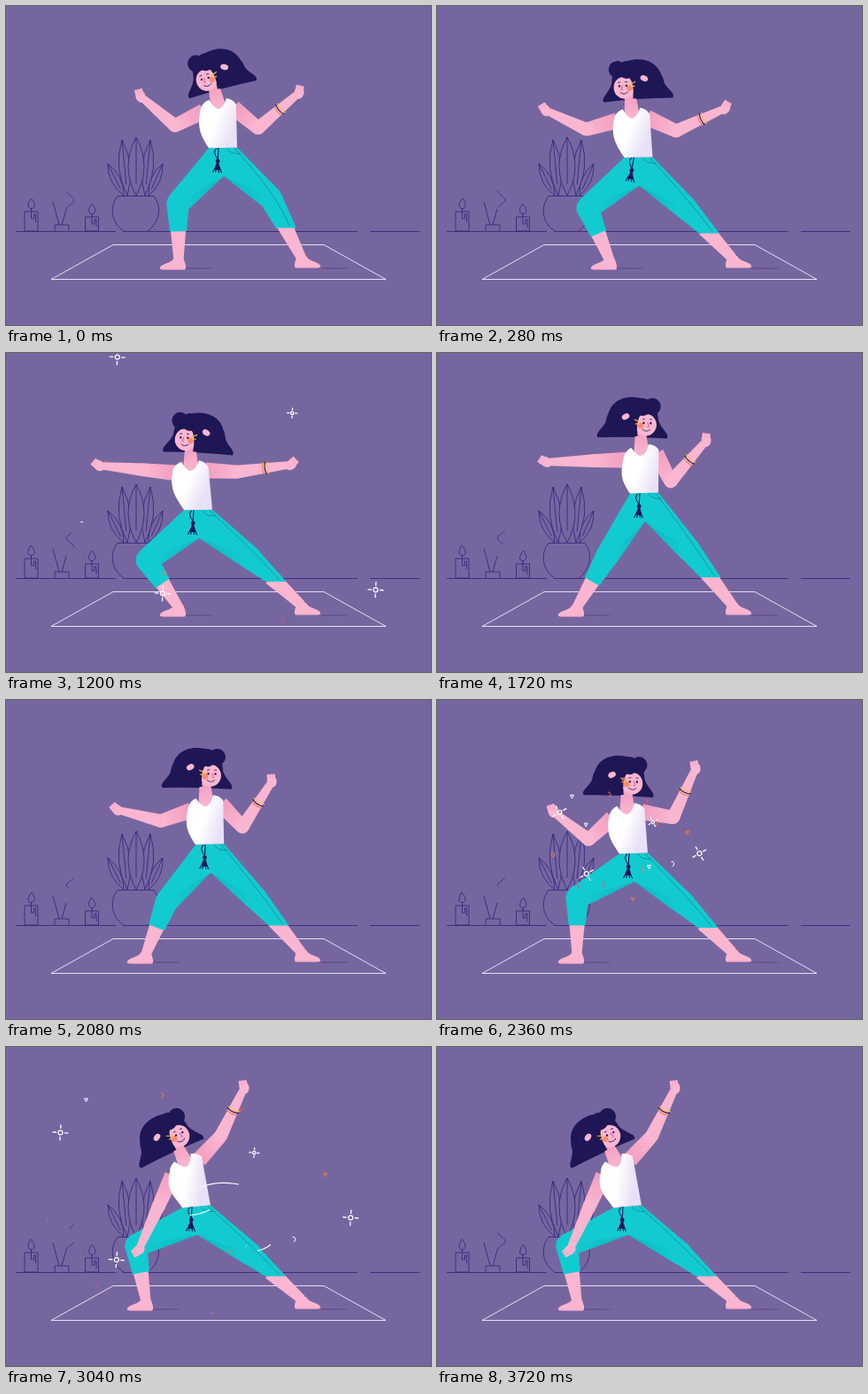
These frames come from a looping animation (480 by 360 pixels, 3800 ms). An HTML page with a canvas:

```html
<!DOCTYPE html>
<html lang="en">
<head>
<meta charset="utf-8">
<title>Yoga flow</title>
<style>
html, body { margin: 0; width: 100%; height: 100%; overflow: hidden; background: #7666a0; }
canvas { display: block; width: 480px; height: 360px; }
</style>
</head>
<body>
<canvas id="stage" width="480" height="360"></canvas>
<script>
const ctx = document.getElementById('stage').getContext('2d');
const LOOP = 3800;
const WALL = '#7666a0', SKIN = '#fab6d0', BLUSH = '#f29ec0', HAIR = '#1f1755', TEAL = '#12cbd0';
const INK = 'rgba(45,35,122,.8)', ORANGE = '#ee7c4c', RED = '#dd5566', YELLOW = '#f3c044', WHITE = '#fff';

const clamp = (v, a = 0, b = 1) => Math.min(b, Math.max(a, v));
const mix = (a, b, k) => Array.isArray(a) ? a.map((v, i) => mix(v, b[i], k)) : a + (b - a) * k;
const add = (p, q) => [p[0] + q[0], p[1] + q[1]];
const gap = (a, b) => Math.hypot(b[0] - a[0], b[1] - a[1]);
const rad = deg => deg * Math.PI / 180;
const turn = ([x, y], deg) => {
  const c = Math.cos(rad(deg)), s = Math.sin(rad(deg));
  return [x * c - y * s, x * s + y * c];
};

const easeIn = k => k * k;
const easeOut = k => 1 - (1 - k) ** 2;
const easeOutCubic = k => 1 - (1 - k) ** 3;
const easeInOut = k => k < .5 ? 4 * k ** 3 : 1 - (2 - 2 * k) ** 3 / 2;

// Elbows, knees, shoulders and head follow from these few joints
const RISE_LEFT = { hip: [245, 160], neck: [239, 104], left: [152, 102], right: [331, 98], foot: 195, lean: -6, tilt: -15, facing: -1 };
const WARRIOR = { hip: [217, 177], neck: [208, 121], left: [105, 127], right: [322, 126], foot: 195, lean: -4, tilt: 3, facing: -1 };
const RISE_RIGHT = { hip: [234, 158], neck: [229, 104], left: [123, 123], right: [304, 99], foot: 158, lean: -11, tilt: 1, facing: 1 };
const SINK = { hip: [222, 173], neck: [213, 117], left: [131, 126], right: [292, 77], foot: 158, lean: -10, tilt: 2, facing: 1 };
const SIDE_BEND = { hip: [215, 180], neck: [199, 124], left: [150, 229], right: [269, 46], foot: 158, lean: -26, tilt: -25, facing: 1 };
const MOVES = [
  [0, 1000, RISE_LEFT, WARRIOR, easeOutCubic],
  [1300, 1720, WARRIOR, RISE_RIGHT, easeInOut],
  [1720, 2360, RISE_RIGHT, SINK, easeIn],
  [2360, 2960, SINK, SIDE_BEND, easeOut]];

function poseAt(t) {
  const [start, end, from, to, ease] = MOVES.findLast(m => t >= m[0]);
  const k = ease(clamp((t - start) / (end - start)));
  return Object.fromEntries(Object.keys(from).map(key => [key, mix(from[key], to[key], k)]));
}

// Middle joint of a two-part limb from a to b
function joint(a, b, upper, lower, bend) {
  const d = gap(a, b);
  if (d >= upper + lower) return mix(a, b, upper / (upper + lower));
  const along = (upper ** 2 - lower ** 2 + d * d) / (2 * d);
  const out = bend * Math.sqrt(Math.max(0, upper ** 2 - along ** 2));
  const ux = (b[0] - a[0]) / d, uy = (b[1] - a[1]) / d;
  return [a[0] + ux * along - uy * out, a[1] + uy * along + ux * out];
}

function fill(style, build) {
  ctx.fillStyle = style;
  ctx.beginPath();
  build();
  ctx.fill();
}

function stroke(style, width, build) {
  ctx.strokeStyle = style;
  ctx.lineWidth = width;
  ctx.beginPath();
  build();
  ctx.stroke();
}

function at([x, y], deg, draw) {
  ctx.save();
  ctx.translate(x, y);
  ctx.rotate(rad(deg));
  draw();
  ctx.restore();
}

const path = (...pts) => pts.forEach((p, i) => i ? ctx.lineTo(...p) : ctx.moveTo(...p));
const poly = (...pts) => { path(...pts); ctx.closePath(); };
const disc = (x, y, r) => { ctx.moveTo(x + r, y); ctx.arc(x, y, r, 0, 7); };
const oval = (x, y, rx, ry, rot = 0) => ctx.ellipse(x, y, rx, ry, rot, 0, 7);

function side(a, b, half) {
  const d = gap(a, b) || 1;
  return [-(b[1] - a[1]) / d * half, (b[0] - a[0]) / d * half];
}

function taper(style, a, b, wa, wb, endSide = side(a, b, wb / 2)) {
  const [ax, ay] = side(a, b, wa / 2), [bx, by] = endSide;
  fill(style, () => poly([a[0] + ax, a[1] + ay], [b[0] + bx, b[1] + by],
    [b[0] - bx, b[1] - by], [a[0] - ax, a[1] - ay]));
}

function gradient(a, b, from, to) {
  const g = ctx.createLinearGradient(...a, ...b);
  g.addColorStop(0, from);
  g.addColorStop(1, to);
  return g;
}

function leaf(base, tip, w) {
  const [nx, ny] = side(base, tip, w), [mx, my] = mix(base, tip, .5);
  const outline = () => {
    ctx.moveTo(...base);
    ctx.quadraticCurveTo(mx + nx, my + ny, ...tip);
    ctx.quadraticCurveTo(mx - nx, my - ny, ...base);
  };
  fill(WALL, outline);
  stroke(INK, 1, () => { outline(); path(tip, mix(tip, base, .8)); });
}

function candle(x, y, t) {
  const c = x + 7.5, sway = Math.sin(t / LOOP * Math.PI * 12) * .7;
  stroke(INK, 1, () => {
    ctx.rect(x, y, 15, 254 - y);
    path([c, y], [c, y - 4]);
    ctx.moveTo(c, y - 3);
    ctx.bezierCurveTo(c - 6, y - 5, c - 3, y - 11, c + sway, y - 15);
    ctx.bezierCurveTo(c + 4, y - 10, c + 6, y - 5, c, y - 3);
    path([c, y], [c, y + 8], [c + 3, y + 8], [c + 3, y + 3], [c + 5, y + 3], [c + 5, y + 12]);
  });
}

function smoke(low, high) {
  if (low - high < 1) return;
  stroke(INK, 1, () => {
    for (let y = low; y >= high; y -= .5)
      ctx.lineTo(72.7 + 4.3 * Math.cos((y - 219) * Math.PI / 10), y);
  });
}

function room(t) {
  ctx.fillStyle = WALL;
  ctx.fillRect(0, 0, 480, 360);
  for (const dir of [-1, 1]) {
    leaf([147 + dir * 10, 214], [147 + dir * 16, 151], 13);
    leaf([147 + dir * 14, 214], [146 + dir * 31, 178], 10);
  }
  leaf([147, 214], [147, 148], 18);
  stroke(INK, 1, () => {
    path([11, 254.5], [124, 254.5]);
    path([132, 254.5], [397, 254.5]);
    path([411, 254.5], [467, 254.5]);
    ctx.moveTo(126, 214.5);
    ctx.lineTo(167, 214.5);
    ctx.bezierCurveTo(176, 226, 174, 244, 160, 254);
    ctx.moveTo(133, 254);
    ctx.bezierCurveTo(118, 244, 117, 226, 126, 214.5);
    path([55, 254], [55, 247], [71, 247], [71, 254]);
    path([60, 247], [53, 221]);
    path([63, 247], [68, 229]);
  });
  candle(21, 232, t);
  candle(89.5, 238, t + 300);
  const k = t / LOOP;
  smoke(229 - 30 * k, Math.max(200, 209 - 20 * k));
  smoke(229, 229 - 20 * clamp((t - 2560) / 1100));
  stroke('rgba(255,255,255,.8)', 1, () => poly([121, 269.5], [359, 269.5], [429, 308.5], [51, 308.5]));
}

function foot([x, y], dir) {
  fill('rgba(50,36,110,.28)', () => oval(x + 29 + dir * 7, 296, 17, 1.1));
  ctx.save();
  ctx.translate(x, y);
  ctx.scale(dir, 1);
  fill(SKIN, () => {
    ctx.moveTo(-5, -3);
    ctx.lineTo(5, -3);
    ctx.bezierCurveTo(8, 4, 19, 3, 21, 8);
    ctx.quadraticCurveTo(22, 10.5, 18, 10.5);
    ctx.lineTo(-7, 10.5);
    ctx.quadraticCurveTo(-10, 8, -5, -3);
  });
  stroke(BLUSH, .7, () => path([-6, 10], [18, 10]));
  ctx.restore();
}

function hand(p, forearm, dir) {
  at(p, forearm - dir * 35, () => {
    fill(SKIN, () => oval(0, 0, 7, 5.5));
    ctx.lineCap = 'round';
    for (const y of [-3.6, -.6, 2.4]) stroke(SKIN, 3.2, () => path([3, y], [7, y]));
    ctx.lineCap = 'butt';
    for (const y of [-2, 1]) stroke(BLUSH, .8, () => path([3, y], [8, y]));
  });
}

function bracelet(elbow, palm) {
  [[ORANGE, .49], [HAIR, .53], [YELLOW, .57]].forEach(([color, k]) => {
    const p = mix(elbow, palm, k), [nx, ny] = side(elbow, palm, 7);
    stroke(color, 1.1, () => {
      ctx.moveTo(p[0] - nx, p[1] - ny);
      ctx.quadraticCurveTo(p[0] - ny * .4, p[1] + nx * .4, p[0] + nx, p[1] + ny);
    });
  });
}

function arm(shoulder, palm, forearm, dir) {
  const elbow = joint(shoulder, palm, 36, forearm, dir);
  const wrist = mix(elbow, palm, 1 - 4 / gap(elbow, palm));
  taper(gradient(shoulder, elbow, BLUSH, SKIN), shoulder, elbow, 18, 15);
  fill(SKIN, () => disc(...elbow, 7.4));
  taper(SKIN, elbow, wrist, 15, 8.5);
  hand(palm, Math.atan2(palm[1] - elbow[1], palm[0] - elbow[0]) * 180 / Math.PI, dir);
  if (dir > 0) bracelet(elbow, palm);
}

function leg(hip, waist, crotch, ankle, thigh, shin, dir) {
  const knee = joint(hip, ankle, thigh, shin, -dir), cuff = mix(knee, ankle, .49);
  const [nx, ny] = side(hip, knee, -13 * dir);
  const inner = [knee[0] - nx, knee[1] - ny];
  // The far trouser leg ends in a level hem
  const hem = dir > 0 ? [-11.5, 0] : side(knee, cuff, 9.5);
  foot(ankle, dir);
  taper(SKIN, mix(knee, ankle, .4), ankle, 18, 11);
  fill(TEAL, () => poly(waist, [knee[0] + nx, knee[1] + ny], inner, crotch));
  fill(gradient(crotch, knee, 'rgba(8,145,170,.3)', 'rgba(8,145,170,0)'), () => poly(crotch, inner, knee));
  fill(TEAL, () => disc(...knee, 12.7));
  taper(TEAL, knee, cuff, 25.4, 20, hem);
  return { knee, cuff };
}

function pants({ hip, foot: footX, lean }, t) {
  const wL = add(hip, turn([-16, 0], lean * .2)), wR = add(hip, turn([16, 0], lean * .2));
  const crotch = add(hip, [1, 32]);
  const step = Math.sin(clamp((t - 1300) / 420) * Math.PI) * 6;
  const { knee, cuff } = leg(hip, wR, crotch, [334, 285], 79, 76, 1);
  leg(hip, wL, crotch, [footX, 287 - step], 81, 64, -1);
  fill(TEAL, () => poly(wL, wR, add(crotch, [4, 0]), add(crotch, [-4, 0])));
  stroke('#168795', .8, () => {
    ctx.moveTo(wR[0] - 11, wR[1] + 1);
    ctx.quadraticCurveTo(wR[0] - 8, wR[1] + 8, wR[0] + 4, wR[1] + 7);
    ctx.moveTo(wR[0] - 3, wR[1] + 1);
    ctx.quadraticCurveTo(knee[0] + 6, knee[1] - 6, cuff[0] + 4, cuff[1] - 2);
  });
  return [wL, wR];
}

function shirt(neck, lean, sL, sR, wL, wR) {
  const near = (x, y) => add(neck, turn([x, y], lean));
  const shade = gradient(mix(sL, sR, .6), add(sR, [5, 10]), WHITE, '#e8e0f6');
  fill(shade, () => {
    ctx.moveTo(...near(-10, 1));
    ctx.quadraticCurveTo(...near(0, 23), ...near(10, 1));
    ctx.quadraticCurveTo(...near(17, 3), ...sR);
    ctx.lineTo(...wR);
    ctx.lineTo(...wL);
    ctx.bezierCurveTo(wL[0] - 9, wL[1] - 14, sL[0] - 5, sL[1] + 22, ...sL);
    ctx.quadraticCurveTo(...near(-17, 3), ...near(-10, 1));
  });
}

function tassel(p, t) {
  const swing = 23 * Math.exp(-(((t - 560) / 250) ** 2)) + 3;
  at(p, swing, () => {
    stroke(HAIR, 1.1, () => {
      path([0, 0], [0, 15]);
      ctx.moveTo(0, 13);
      ctx.quadraticCurveTo(-7, 5, -2, 1);
      for (const x of [-5, -2, 2, 5]) path([0, 17], [x, 28]);
    });
    fill(HAIR, () => { disc(0, 15, 2.4); poly([-1, 16], [1, 16], [3.5, 25], [-3.5, 25]); });
  });
}

function hair() {
  ctx.moveTo(-39, 19);
  ctx.bezierCurveTo(-43, 13, -31, 9, -28, -5);
  ctx.bezierCurveTo(-26, -20, -14, -27, 0, -27);
  ctx.bezierCurveTo(14, -27, 26, -20, 28, -5);
  ctx.bezierCurveTo(31, 9, 43, 13, 39, 19);
  ctx.quadraticCurveTo(0, 17, -39, 19);
}

function face(f) {
  fill(SKIN, () => oval(f * 15, 4, 12, 12.5));
  fill(HAIR, () => {
    ctx.moveTo(f * 29, -2);
    ctx.quadraticCurveTo(f * 22, -10, f * 9, -8);
    ctx.quadraticCurveTo(f * 3, 2, f * 6, 17);
    ctx.lineTo(-f * 34, 18);
    ctx.bezierCurveTo(-f * 29, 8, -f * 32, -2, -f * 27, -9);
    ctx.bezierCurveTo(-f * 18, -30, f * 16, -30, f * 27, -14);
  });
  fill(HAIR, () => { disc(f * 22, -17, 9.5); disc(f * 11, -16, 10); });
  fill(SKIN, () => oval(-f * 8, -5, 4.5, 3.2, -f * .5));
  fill('#f98b6e', () => disc(f * 9, 5, 3.3));
  fill(HAIR, () => { disc(f * 20.5, 2, 1.2); disc(f * 12.5, 2, 1.2); });
  stroke(HAIR, .8, () => {
    path([f * 22, -2], [f * 19, -2.5]);
    path([f * 14, -2.5], [f * 11, -2]);
    ctx.moveTo(f * 20, 9);
    ctx.quadraticCurveTo(f * 16, 13, f * 11, 9);
  });
  stroke('#d9578a', .9, () => path([f * 17, 1], [f * 18.5, 6], [f * 16.5, 6.5]));
  stroke(YELLOW, 1.1, () => { path([f * 9, 1], [f * 2, -2]); path([f * 8, 3], [f * 3, 3]); });
}

function figure(t) {
  const pose = poseAt(t), { neck, lean, tilt, facing } = pose;
  const sL = add(neck, turn([-20, 9], lean)), sR = add(neck, turn([20, 9], lean));
  const head = add(neck, turn([-facing * 8.5, -27], tilt));
  const jaw = add(head, turn([facing * 9, 12], tilt)), collar = add(neck, turn([0, 12], lean));

  at(head, tilt, () => fill(HAIR, hair));
  taper(gradient(jaw, collar, BLUSH, SKIN), jaw, collar, 12, 18);
  const [wL, wR] = pants(pose, t);
  arm(add(sR, [-3, 4]), pose.right, 61, 1);
  arm(add(sL, [3, 4]), pose.left, 51, -1);
  shirt(neck, lean, sL, sR, wL, wR);
  tassel(add(pose.hip, [-5, 0]), t);
  at(head, tilt, () => face(facing));
}

const random = seed => {
  const v = Math.sin(seed * 127.1 + 11.7) * 43758.5453;
  return v - Math.floor(v);
};

function sparkle(size, spin) {
  ctx.rotate(spin);
  disc(0, 0, size * .28);
  for (let i = 0; i < 4; i++) {
    const ray = turn([size, 0], i * 90);
    path(mix([0, 0], ray, .5), ray);
  }
}

const BITS = [
  s => disc(0, 0, s),
  s => ctx.arc(0, 0, s * 1.4, -1.8, 1.4),
  s => poly([-s, -s], [s, -s], [0, s]),
  s => path([-s, 0], [s, -s * .3])];

// Sparkles and small bits fly out of the body, slow down and shrink away
function burst(t, born, origin, sparkles, seed) {
  const age = t - born;
  if (age <= 0) return;
  const travel = 1 - Math.exp(-age / 250) + age * .00003;
  const show = (goal, life, draw) => {
    const scale = clamp(age / 120) * clamp((life - age) / 160);
    if (scale > 0) at(mix(origin, goal, travel), 0, () => draw(scale));
  };
  sparkles.forEach((goal, i) => show(goal, 1300, scale =>
    stroke(WHITE, 1.3, () => sparkle((i < 3 ? 9 : 6) * scale, Math.exp(-age / 250) * 2))));
  for (let i = 0; i < 14; i++) {
    const n = seed + i * 3, reach = 80 + 100 * random(n);
    const goal = add(origin, turn([reach, 0], i * 137.5 + seed));
    const color = [ORANGE, WHITE, ORANGE, RED][i % 4];
    show(goal, 500 + 800 * random(n + 1), scale =>
      stroke(color, 1, () => BITS[Math.floor(random(n + 2) * 4)](1.9 * scale)));
  }
}

// Grows from a to b, then is erased from the same end
function streak(color, t, middle, a, b, bend) {
  const k = (t - middle) / 400 + .5;
  if (k <= 0 || k >= 1) return;
  stroke(color, 1.2, () => {
    for (let i = 0; i <= 12; i++) {
      const u = mix(clamp(k * 2 - 1), clamp(k * 2), i / 12);
      ctx.lineTo(...add(mix(a, b, u), [0, -bend * Math.sin(u * Math.PI)]));
    }
  });
}

function render(now) {
  const t = Math.floor((now % LOOP) / 40) * 40;
  room(t);
  figure(t);
  burst(t, 280, [215, 150], [[126, 5], [177, 271], [417, 267], [323, 68]], 5);
  burst(t, 2200, [210, 155], [[60, 96], [124, 241], [391, 193], [281, 119]], 61);
  streak(RED, t, 560, [197, 144], [228, 149], 0);
  streak(WHITE, t, 3040, [219, 158], [263, 155], 3);
  streak(WHITE, t, 3040, [207, 190], [230, 184], -1);
  streak(WHITE, t, 3040, [284, 230], [299, 223], -1);
}

const begun = performance.now();
function frame() {
  render(performance.now() - begun);
  requestAnimationFrame(frame);
}
frame();
</script>
</body>
</html>
```
